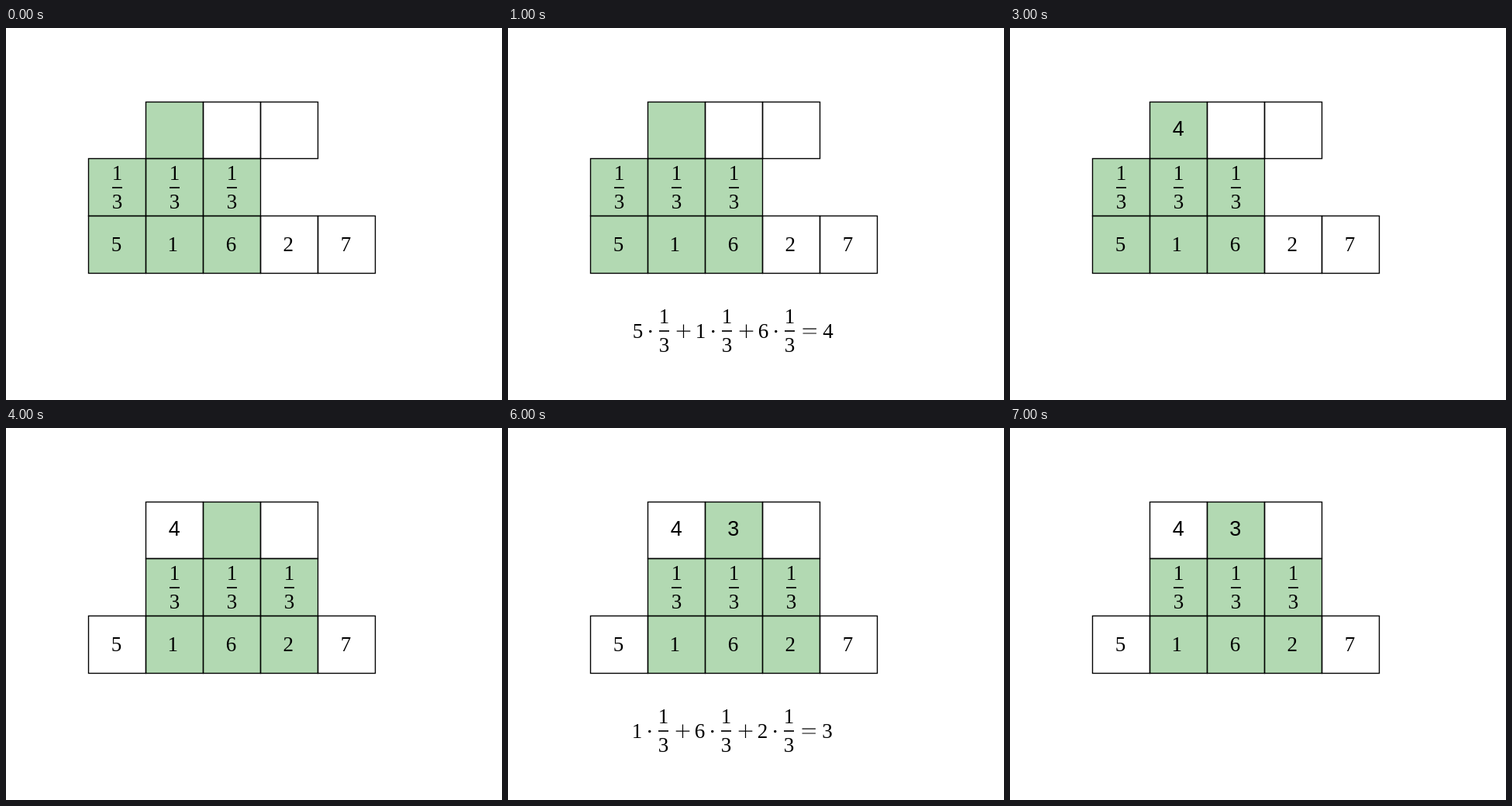
An HTML page for the animation above (8 s loop, 640 by 480 pixels).

```html
<!DOCTYPE html>
<html lang="en">
<head>
<meta charset="utf-8">
<title>Moving average</title>
<style>
  html, body { margin: 0; width: 100%; height: 100%; overflow: hidden; background: #fff; }
  svg { display: block; }
  text { font: 27px "Liberation Serif", "Times New Roman", serif; text-anchor: middle; }
  .sans { font-family: "Liberation Sans", Arial, sans-serif; }
  rect, path { stroke: #000; stroke-width: 1.39; }
  path { fill: none; }
</style>
</head>
<body>
<svg id="stage" width="640" height="480" viewBox="0 0 640 480"></svg>
<script>
const stage = document.getElementById("stage");
const values = [5, 1, 6, 2, 7];
const averages = [4, 3];
const digitX = [142.5, 215.2, 290.5, 364.3, 438.5];
const rowY = [95.5, 168.5, 242.5, 316.5];
const LOOP = 8000, STEP = 4000;

const text = (x, y, s, cls = "") => `<text x="${x}" y="${y}" class="${cls}">${s}</text>`;
const line = (d, width = 1.39) => `<path d="${d}" style="stroke-width:${width}"/>`;

function cell(col, row, lit) {
  const fill = lit ? "rgba(0,128,0,.3)" : "none";
  return `<rect x="${106.5 + 74 * col}" y="${rowY[row]}" width="74" height="${rowY[row + 1] - rowY[row]}" fill="${fill}"/>`;
}

// y is the middle of the fraction bar
const third = (x, y) =>
  text(x, y - 10, 1) + line(`M${x - 6.5} ${y}h13`, 1.7) + text(x, y + 27.3, 3);

function equation(start) {
  const dx = -start;
  let out = "";
  for (let i = 0; i < 3; i++) {
    const x = 167.5 + 81 * i + dx;
    out += text(x, 399.6, values[start + i]);
    out += `<circle cx="${x + 16.2}" cy="391.5" r="1.7"/>`;
    out += third(x + 34, 391);
    if (i < 2) out += line(`M${x + 50.2} 391.2h17.6M${x + 59} 382.4v17.6`, 1.2);
  }
  out += line(`M${380.5 + dx} 388.2h17.4m-17.4 5.8h17.4`, 1.2);
  return out + text(413 + dx, 399.6, averages[start]);
}

function picture(start, phase) {
  const inWindow = col => col >= start && col < start + 3;
  let out = "";
  values.forEach((v, i) => out += cell(i, 2, inWindow(i)));
  for (let i = start; i < start + 3; i++) out += cell(i, 1, true);
  for (let i = 0; i < 3; i++) out += cell(i + 1, 0, i === start);
  values.forEach((v, i) => out += text(digitX[i], 287.5, v));
  for (let i = start; i < start + 3; i++) out += third(143.5 + 74 * i, 206);

  const known = start + (phase >= 2 ? 1 : 0);
  for (let i = 0; i < known; i++) out += text(217.3 + 73.5 * i, 139, averages[i], "sans");
  if (phase === 1 || phase === 2) out += equation(start);
  return out;
}

let shown = -1;
function draw(now) {
  const t = now % LOOP;
  const second = Math.floor(t / 1000);
  if (second !== shown) {
    shown = second;
    stage.innerHTML = picture(Math.floor(t / STEP), second % 4);
  }
  requestAnimationFrame(() => draw(performance.now() - began));
}
const began = performance.now();
draw(0);
</script>
</body>
</html>
```
